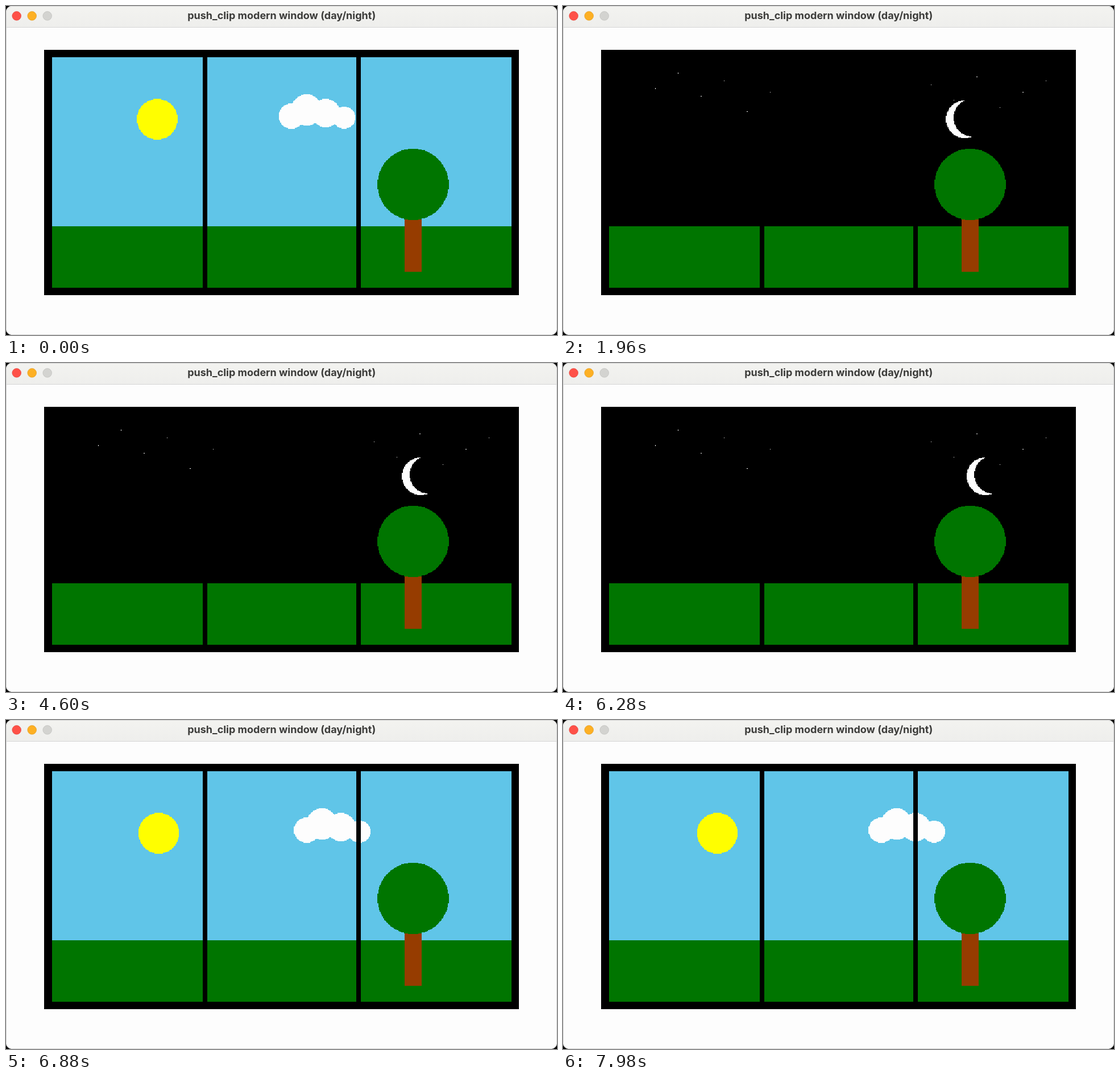
An HTML page for the animation above (8000 ms loop, 969 by 578 pixels).

```html
<!DOCTYPE html>
<html lang="en">
<head>
<meta charset="utf-8">
<title>push_clip modern window (day/night)</title>
<style>
  html, body { margin: 0; width: 100%; height: 100%; overflow: hidden; background: #000; }
  svg { display: block; width: 969px; height: 578px; }
  text { font: 700 18px Inter, "Liberation Sans", sans-serif; fill: #3c3c3a; text-anchor: middle; }
</style>
</head>
<body>
<svg viewBox="0 0 969 578">
  <defs>
    <linearGradient id="bar" x1="0" y1="0" x2="0" y2="1">
      <stop offset="0" stop-color="#f3f3f0"/>
      <stop offset="1" stop-color="#eeeeec"/>
    </linearGradient>
    <clipPath id="frame"><rect width="969" height="578" rx="10"/></clipPath>
  </defs>
  <g clip-path="url(#frame)">
    <rect width="969" height="578" fill="#fdfdfd"/>
    <rect width="969" height="37" fill="url(#bar)"/>
    <rect y="37" width="969" height="1" fill="#d6d6d6"/>
    <rect x=".5" y=".5" width="968" height="577" rx="10" fill="none" stroke="#d2d2d2"/>
    <g stroke-width=".7">
      <circle cx="18.7" cy="17.4" r="7.8" fill="#fe5148" stroke="#e2443c"/>
      <circle cx="45.7" cy="17.4" r="7.8" fill="#fdb024" stroke="#e09a1e"/>
      <circle cx="72.7" cy="17.4" r="7.8" fill="#d3d3d0" stroke="#bebebb"/>
    </g>
    <text x="484.7" y="23">push_clip modern window (day/night)</text>
  </g>
  <g transform="translate(67.35 77) scale(1.347)" shape-rendering="crispEdges">
    <rect width="620" height="320"/>
    <g id="day">
      <rect x="10" y="10" width="600" height="220" fill="#60c5e8"/>
      <path id="sun" fill="#fffe00"/>
      <path id="cloud" fill="#fdfdfd"/>
    </g>
    <g id="night">
      <g id="moon">
        <path id="disc" fill="#fdfdfd"/>
        <path id="shade"/>
      </g>
      <path id="stars" fill="#fdfdfd"/>
    </g>
    <rect x="10" y="230" width="600" height="80" fill="#007500"/>
    <path d="M207 0h6v320h-6zM407 0h6v320h-6z"/>
    <rect x="470.4" y="200" width="22" height="89.6" fill="#963c00"/>
    <path id="crown" fill="#007500"/>
  </g>
</svg>
<script>
const $ = id => document.getElementById(id);
const LOOP = 8000, NIGHT = 380, DAWN = 6300;

// Disc without smoothing, built from rows one unit high
function disc(x, y, size) {
  const r = size / 2;
  let d = "";
  for (let row = 0; row < size; row++) {
    const dy = row + 0.5 - r;
    const inset = Math.round(r - Math.sqrt(r * r - dy * dy));
    d += `M${x + inset} ${y + row}h${size - 2 * inset}v1h${2 * inset - size}z`;
  }
  return d;
}

const setPath = (id, d) => $(id).setAttribute("d", d);
const shift = (id, x) => $(id).setAttribute("transform", `translate(${x} 0)`);
const show = (id, on) => $(id).setAttribute("display", on ? "inline" : "none");

setPath("sun", disc(121, 64, 53));
setPath("cloud", [[306, 70, 33], [322, 58, 41], [349, 64, 37], [377, 74, 29]]
  .map(c => disc(...c)).join(""));
setPath("disc", disc(441, 66, 49));
setPath("shade", disc(451, 64, 49));
setPath("crown", disc(435, 129, 93));

const leftStars = [50, 30, 60, 40, 80, 55].map((y, i) => [70 + 30 * i, y]);
const rightStars = [45, 65, 35, 75, 55, 40].map((y, i) => [430 + 30 * i, y]);
setPath("stars", [...leftStars, ...rightStars].map(([x, y]) => `M${x} ${y}h1v1h-1z`).join(""));

function draw(t) {
  const dark = t >= NIGHT && t < DAWN;
  show("day", !dark);
  show("night", dark);
  if (dark) {
    shift("moon", Math.floor((t - 490) / 158));
  } else {
    // Sun and cloud pause during the night
    const d = t < NIGHT ? t : t - DAWN + NIGHT;
    shift("cloud", 1 + Math.floor((d - 20) / 48));
    shift("sun", Math.floor((d + 100) / 500));
  }
}

const start = performance.now();
function tick() {
  draw((performance.now() - start) % LOOP);
  requestAnimationFrame(tick);
}
draw(0);
requestAnimationFrame(tick);
</script>
</body>
</html>
```
